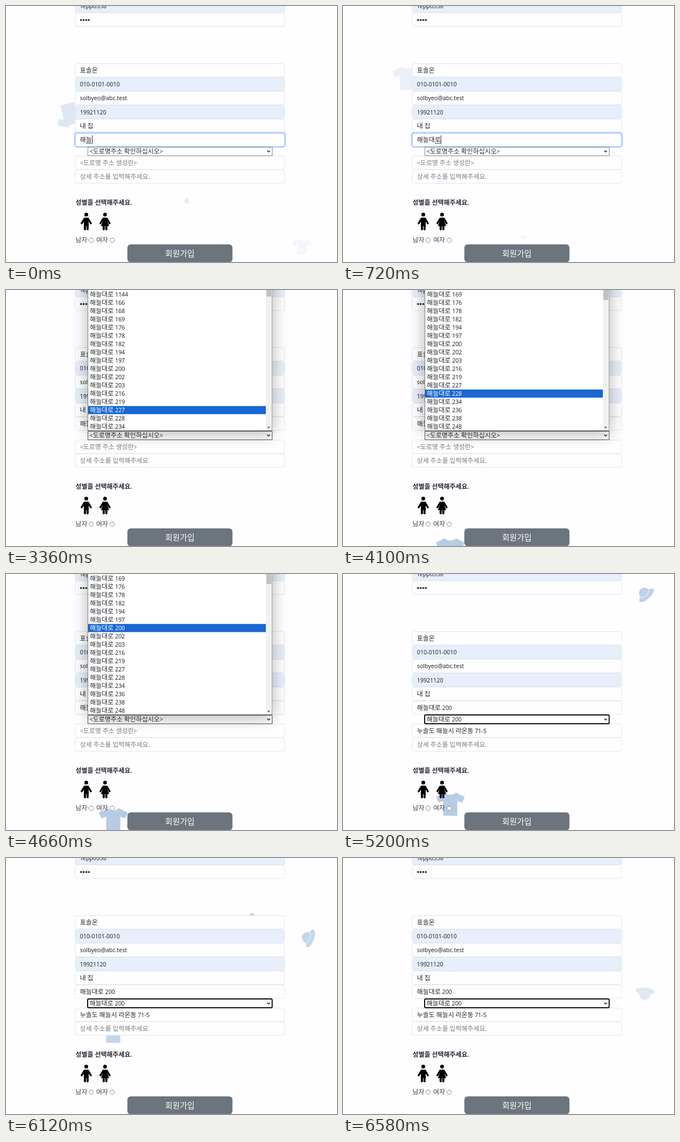
Animation of 600x465 px, one loop 6.6 s. Source, as an HTML page with a canvas:

```html
<!DOCTYPE html>
<html lang="ko">
<head>
<meta charset="utf-8">
<style>
html, body { margin: 0; width: 100%; height: 100%; overflow: hidden; background: #fefdff; }
canvas { display: block; }
</style>
</head>
<body>
<canvas id="stage" width="600" height="465"></canvas>
<script>
const ctx = document.getElementById('stage').getContext('2d');
const LOOP = 6600, OPEN = 2020, SCROLL = 3640, PICK = 4920, KEYSTROKE = 170;
const PAPER = '#fefdff', INK = '#24282d', HINT = '#777b80';
const ROAD = '해늘대로';
const typing = ['해늘', '해늘ㄷ', '해늘대', '해늘댈', ROAD];
const houses = '1144 166 168 169 176 178 182 194 197 200 202 203 216 219 227 228 234 236 238 248'.split(' ');

const progress = (t, start, end) => Math.max(0, Math.min(1, (t - start) / (end - start)));
const mix = (a, b, p) => a + (b - a) * p;
const launch = p => p ** 5.5;
const settle = p => 1 - (1 - p) ** 1.5;

// Clothes drift steadily while the curve adds the dash, the turn and the fade
const floaters = [
  { draw: shirt, x: 116, y: 198, dash: -160, angle: 165, turn: 470, fade: [.42, .03], life: [0, 2400], curve: settle },
  { draw: shirt, x: 537, y: 437, dash: 15, size: .68, fade: [.14, 0], life: [0, 650], curve: settle },
  { draw: hat, x: 327, y: 354, dash: 96, angle: -100, turn: -110, size: .38, fade: [.35, 0], life: [0, 1300], curve: settle },
  { draw: shirt, x: 194.5, y: 490, drift: -130, dash: -180, fade: [.93, .4], life: [3700, LOOP], curve: launch },
  { draw: hat, x: 437, y: -24, drift: 123, dash: 222, angle: -42, turn: -140, fade: [.82, .4], life: [4680, LOOP], curve: launch },
  { draw: hat, x: 547, y: -18, drift: 196, dash: 75, angle: -42, turn: -140, fade: [.82, .4], life: [4680, LOOP], curve: launch }
];

function box(x, y, w, h, r, fill, stroke, line = 1) {
  ctx.beginPath();
  ctx.roundRect(x, y, w, h, r);
  if (fill) { ctx.fillStyle = fill; ctx.fill(); }
  if (stroke) { ctx.strokeStyle = stroke; ctx.lineWidth = line; ctx.stroke(); }
}

function dot(x, y, r, fill) {
  ctx.beginPath();
  ctx.arc(x, y, r, 0, Math.PI * 2);
  ctx.fillStyle = fill;
  ctx.fill();
}

function trace(points) {
  ctx.beginPath();
  points.forEach(([x, y]) => ctx.lineTo(x, y));
}

function lines(points, width, color) {
  trace(points);
  ctx.lineWidth = width;
  ctx.strokeStyle = color;
  ctx.stroke();
}

// Hangul and Latin runs use separate fonts; returns the end position
function text(str, x, midY, color = INK, size = 11.7, weight = 400) {
  ctx.fillStyle = color;
  ctx.wordSpacing = '1.5px';
  for (const run of str.match(/[\x20-\x7e]+|[^\x20-\x7e]+/g)) {
    ctx.font = run.charCodeAt(0) < 127
      ? `${weight} ${size * .89}px "Noto Sans", sans-serif`
      : `${weight} ${size}px "Noto Sans CJK KR", "Noto Sans CJK", sans-serif`;
    ctx.fillText(run, x, midY + size * .35);
    x += ctx.measureText(run).width;
  }
  return x;
}

function shirt() {
  ctx.lineJoin = 'round';
  const half = [[10, -21], [26, -13.2], [21.5, -2.5], [12.8, -5.5], [12.8, 21]];
  const mirrored = half.map(([x, y]) => [-x, y]).reverse();
  trace([...half, ...mirrored]);
  ctx.bezierCurveTo(-6, -15.5, 6, -15.5, 10, -21);
  ctx.closePath();
  ctx.fill();
}

function hat() {
  ctx.beginPath();
  ctx.ellipse(0, 5, 17, 6.5, 0, 0, Math.PI * 2);
  ctx.moveTo(-11, 5);
  ctx.bezierCurveTo(-11, -16, 11, -16, 11, 5);
  ctx.fill();
  ctx.beginPath();
  ctx.moveTo(-11, 1);
  ctx.quadraticCurveTo(0, 7, 11, 1);
  ctx.strokeStyle = PAPER;
  ctx.lineWidth = 1.3;
  ctx.stroke();
}

function floater({ draw, x, y, drift = 0, dash, angle = 0, turn = 0, size = 1, fade, life, curve }, t) {
  if (t < life[0] || t >= life[1]) return;
  const p = progress(t, ...life), c = curve(p);
  ctx.save();
  ctx.translate(x, y + drift * p + dash * c);
  ctx.rotate((angle + turn * c) * Math.PI / 180);
  ctx.scale(size, size);
  ctx.globalAlpha = mix(...fade, c);
  ctx.fillStyle = '#b1c9e3';
  draw();
  ctx.restore();
}

function field(y, filled) {
  box(125.5, y + .5, 379.5, 24.5, 4, filled ? '#e6effb' : '#fefeff', '#e3e5ea');
}

function person(x, waist, hem) {
  ctx.save();
  ctx.translate(x, 375.3);
  ctx.lineCap = 'round';
  dot(0, 3.6, 3.4, '#000');
  for (const side of [-1, 1]) {
    lines([[side * 3.5, 11.3], [side * 8.4, 19.5]], 3.3, '#000');
    lines([[side * 2.4, 20], [side * 2.4, 30.3]], 3.8, '#000');
  }
  trace([[-4, 9.3], [4, 9.3], [waist, 15], [hem, 24.5], [-hem, 24.5], [-waist, 15]]);
  ctx.fill();
  ctx.restore();
}

function roadField(t) {
  field(230);
  ctx.globalAlpha = 1 - progress(t, OPEN, OPEN + 160);
  box(125, 230.5, 380.5, 25, 4, null, '#c2dafe', 4);
  box(125.5, 231, 379.5, 24.5, 4, '#fefeff', '#86b7fe');
  ctx.globalAlpha = 1;
  if (t >= PICK) return text(ROAD + ' 200', 134, 243);

  const typed = typing[Math.min(typing.length - 1, Math.floor(t / KEYSTROKE))];
  const lastStart = text(typed.slice(0, -1), 134, 243);
  const end = text(typed.slice(-1), lastStart, 243);
  if (t >= OPEN) return;
  ctx.fillRect(lastStart, 249, end - lastStart, .8);
  const sinceTyped = t - KEYSTROKE * (typing.length - 1);
  if (sinceTyped < 0 || sinceTyped % 1000 < 500) ctx.fillRect(Math.round(end), 235, 1, 15);
}

function select(t) {
  const picked = t >= PICK;
  if (picked) box(148, 256, 334.5, 16, 2, '#fff', '#101010', 2);
  else box(148.5, 256.5, 334, 15.5, 0, '#fff', t >= 1880 ? '#505050' : '#858585');
  text(picked ? ROAD + ' 200' : '<도로명주소 확인하십시오>', 151.5, 264.3);
  lines([[473.5, 262.7], [476, 265.3], [478.5, 262.7]], 1.4, '#222');
}

function dropdown(t) {
  if (t < OPEN || t >= PICK) return;
  const scrolled = t >= SCROLL ? 3 : 0;
  const pointer = Math.round(16 - 4 * progress(t, 3200, 3600) - 6 * progress(t, 4100, 4600));
  const hover = t < 3240 ? -1 : pointer;
  ctx.save();
  ctx.globalAlpha = progress(t, OPEN - 20, OPEN + 180);
  ctx.shadowColor = 'rgba(0,0,0,.3)';
  ctx.shadowBlur = 26;
  ctx.shadowOffsetY = 5;
  box(148, -30, 334.5, 286, 0, '#fff');
  ctx.shadowColor = 'transparent';
  box(148.5, -30, 333.5, 285.5, 0, '#fff', '#7c7c7c');
  for (let row = 0; row < 17; row++) {
    const y = 8 + row * 15, active = row === hover;
    if (active) box(149, y - 7.2, 322, 14.7, 0, '#1967d2');
    text(`${ROAD} ${houses[row + scrolled]}`, 152, y, active ? '#fff' : INK);
  }
  box(471, 0, 10.5, 255, 0, '#f1f1f1');
  box(472, 0, 9, 12 + scrolled * 2, 0, '#c1c1c1');
  trace([[473.5, 248.5], [479, 248.5], [476.2, 251.3]]);
  ctx.fillStyle = '#505050';
  ctx.fill();
  ctx.restore();
}

function gender() {
  text('성별을 선택해주세요.', 126, 357, INK, 11.7, 700);
  person(145.5, 4.3, 4.3);
  person(179.5, 3.8, 7.5);
  ['남자', '여자'].forEach((label, i) => {
    text(label, 126 + i * 37.5, 425, '#3c4045');
    dot(154.5 + i * 38, 425.5, 4.4, '#858585');
    dot(154.5 + i * 38, 425.5, 3.5, '#fff');
  });
}

function render(t) {
  ctx.fillStyle = PAPER;
  ctx.fillRect(0, 0, 600, 465);
  floaters.forEach(f => floater(f, t));

  field(-13, true);
  text('Teppo358', 134, 0);
  field(12);
  for (let i = 0; i < 4; i++) dot(136 + i * 4.7, 25.5, 1.8, INK);

  ['표솔온', '010-0101-0010', 'solbyeo@abc.test', '19921120', '내 집'].forEach((value, i) => {
    const y = 104 + i * 25.2;
    field(y, i % 2);
    text(value, 134, y + 13);
  });

  field(272);
  if (t < PICK) text('<도로명 주소 생성란>', 134, 285, HINT);
  else text('누솔도 해늘시 라온동 71-5', 134, 285);
  field(297);
  text('상세 주소를 입력해주세요.', 134, 310, HINT);
  roadField(t);
  select(t);

  gender();
  box(220, 433, 190.5, 32.5, 6, '#6c757d');
  text('회원가입', 288.5, 449.5, '#fff', 14.5);
  dropdown(t);
}

function frame() {
  render(performance.now() % LOOP);
  requestAnimationFrame(frame);
}
frame();
</script>
</body>
</html>
```
